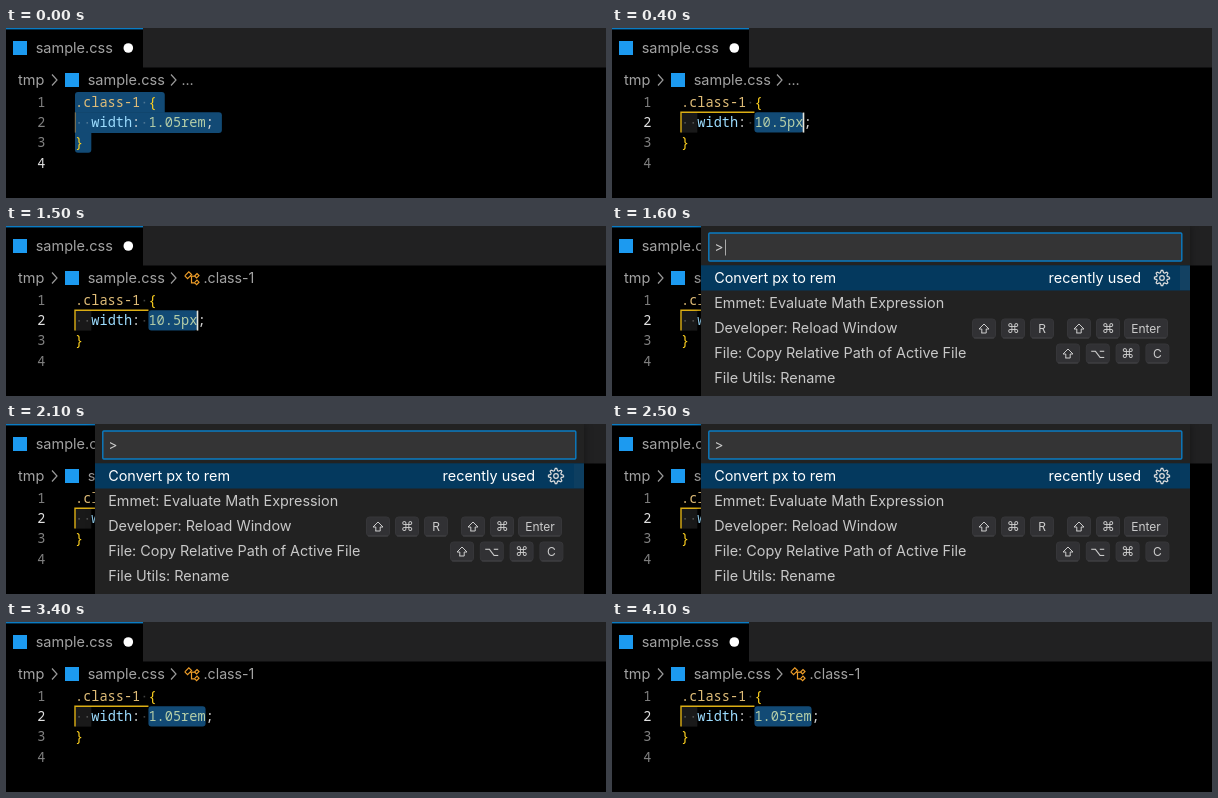
Write an HTML page with a canvas that moves like this. It is 600x170 px and loops after 4.2 s.

```html
<!DOCTYPE html>
<html lang="en">
<head>
<meta charset="utf-8">
<title>Convert px to rem</title>
<style>
  html, body { margin: 0; width: 100%; height: 100%; overflow: hidden; background: #000; }
  canvas { display: block; width: 600px; height: 170px; }
</style>
</head>
<body>
<canvas id="stage" width="600" height="170"></canvas>
<script>
const ctx = document.getElementById('stage').getContext('2d');
const LOOP = 4200, UNDO = 400, OUTLINE = 800, OPEN = 1600, CLOSE = 2600, BLINK = 500;
const UI = 'Inter, "Open Sans", sans-serif';
const MONO = '"Noto Sans Mono", "DejaVu Sans Mono", monospace';
const SYMBOLS = '"DejaVu Sans", sans-serif';
const CHAR = 8.16, LEFT = 69, TOP = 64.1, ROW = 20.25;
const SELECTION = '#124a75', BLUE = '#1c9af0', GOLD = '#ffd21f';

const col = n => LEFT + n * CHAR;
const lineTop = n => TOP + (n - 1) * ROW;
const blinkOn = age => Math.floor(age / BLINK) % 2 === 0;

function rect(x, y, w, h, fill) {
  ctx.fillStyle = fill;
  ctx.fillRect(x, y, w, h);
}

function box(x, y, w, h, radius, fill, stroke, width = 1) {
  ctx.beginPath();
  ctx.roundRect(x, y, w, h, radius);
  if (fill) { ctx.fillStyle = fill; ctx.fill(); }
  if (stroke) { ctx.strokeStyle = stroke; ctx.lineWidth = width; ctx.stroke(); }
}

function text(str, x, y, size, color, family = UI, align = 'left', weight = 400) {
  ctx.font = `${weight} ${size}px ${family}`;
  ctx.textAlign = align;
  ctx.fillStyle = color;
  ctx.fillText(str, x, y);
}

function line(points, color, width = 1.2) {
  ctx.beginPath();
  points.forEach(([x, y], i) => i ? ctx.lineTo(x, y) : ctx.moveTo(x, y));
  ctx.strokeStyle = color;
  ctx.lineWidth = width;
  ctx.stroke();
}

function code(row, start, str, color) {
  text(str, col(start), lineTop(row) + 14.8, 13.6, color, MONO, 'left', 500);
}

function dot(row, n) {
  rect(col(n) + 3.3, lineTop(row) + 9.7, 1.6, 1.6, 'rgba(227,228,226,.28)');
}

function caret(row, n) {
  rect(col(n) - 0.7, lineTop(row) + 0.2, 1.6, 20, '#e4e4dc');
}

function chevron(x) {
  line([[x - 2.5, 46.5], [x + 2.5, 52], [x - 2.5, 57.5]], '#999');
}

function classIcon(x, y) {
  const color = '#ee9d28';
  ctx.save();
  ctx.translate(x, y);
  line([[0.8, 4.8], [4.8, 0.8], [7.6, 3.6], [3.6, 7.6], [0.8, 4.8]], color);
  line([[6, 5.2], [11, 5.2]], color);
  line([[7.5, 5.2], [7.5, 11.8], [11, 11.8]], color);
  for (const dy of [5, 11.6])
    line([[10.6, dy], [13, dy - 2.4], [15, dy - 0.4], [12.6, dy + 2], [10.6, dy]], color);
  ctx.restore();
}

function header(outlined) {
  rect(137, 0, 463, 39.5, '#212122');
  rect(0, 0, 137, 1.4, '#0a7cc4');
  rect(7, 13, 14, 14, BLUE);
  text('sample.css', 29.7, 25, 14.5, '#a2a2a2');
  ctx.beginPath();
  ctx.arc(122.3, 20, 4.8, 0, 7);
  ctx.fillStyle = '#fff';
  ctx.fill();

  text('tmp', 12, 57, 14.5, '#a2a2a2');
  chevron(48.5);
  rect(59, 45, 14, 14, BLUE);
  text('sample.css', 81.7, 57, 14.5, '#a2a2a2');
  chevron(167.5);
  if (outlined) {
    classIcon(178, 45);
    text('.class-1', 197.5, 57, 14.2, '#a2a2a2');
  } else {
    text('…', 175.5, 57, 14, '#a2a2a2');
  }
}

function editor(value, undone) {
  const activeRow = undone ? 2 : 4;
  const valueEnd = 9 + value.length;
  const top = lineTop(2);

  rect(LEFT, top, 2 * CHAR, ROW, '#191919');
  if (undone) {
    box(col(9), top, value.length * CHAR, ROW, 3, SELECTION);
    line([[col(9), top - 0.1], [LEFT, top - 0.1], [LEFT, top + ROW]], '#dcae14', 1.4);
  } else {
    box(LEFT, lineTop(1), 11 * CHAR, ROW + 0.3, [3, 3, 0, 0], SELECTION);
    box(LEFT, top, (valueEnd + 2) * CHAR, ROW + 0.3, [0, 3, 3, 0], SELECTION);
    box(LEFT, lineTop(3), 2 * CHAR, ROW, [0, 0, 3, 3], SELECTION);
    line([[LEFT + 0.3, top], [LEFT + 0.3, top + ROW]], '#8b7950', 1);
  }

  for (let row = 1; row <= 4; row++)
    text(row, 39.5, lineTop(row) + 14.8, 13.6, row === activeRow ? '#e0e0e0' : '#808080', MONO, 'right');

  code(1, 0, '.class-1', '#e0bd78');
  code(1, 9, '{', GOLD);
  code(2, 2, 'width', '#9cdcfe');
  code(2, 7, ':', '#d4d4d4');
  code(2, 9, value, '#b5cea8');
  code(2, valueEnd, ';', '#d4d4d4');
  code(3, 0, '}', GOLD);
  dot(1, 8);
  [0, 1, 8].forEach(n => dot(2, n));
}

function shiftArrow(x, y) {
  line([[x - 2.2, y + 4.5], [x - 2.2, y + 0.5], [x - 5, y + 0.5], [x, y - 4.5],
    [x + 5, y + 0.5], [x + 2.2, y + 0.5], [x + 2.2, y + 4.5], [x - 2.7, y + 4.5]], '#ccc', 1);
}

function keycap(label, x, y, w = 24) {
  box(x + 0.5, y + 0.5, w - 1, 19, 3, '#313134', '#363639');
  rect(x + 2, y + 19, w - 4, 1, '#434346');
  const symbol = label.charCodeAt(0) > 255;
  if (label === '⇧') shiftArrow(x + w / 2, y + 10);
  else text(label, x + w / 2, y + 14.3, symbol ? 13 : 12, '#ccc', symbol ? SYMBOLS : UI, 'center');
}

function gear(x, y) {
  const points = [];
  for (let i = 0; i <= 32; i++) {
    const angle = (i - 0.5) * Math.PI / 16;
    const r = i % 4 < 2 ? 7.6 : 5.5;
    points.push([x + r * Math.cos(angle), y + r * Math.sin(angle)]);
  }
  line(points, '#ddd', 1.2);
  ctx.beginPath();
  ctx.arc(x, y, 2.3, 0, 7);
  ctx.stroke();
}

function palette(t) {
  ctx.save();
  ctx.shadowColor = 'rgba(0,0,0,.4)';
  ctx.shadowBlur = 8;
  rect(89, 0, 489, 170, '#222222');
  ctx.restore();

  box(96.8, 7, 473, 28, 1, '#343435', '#0a7cc4', 1.4);
  text('>', 102.5, 26, 13.5, '#ccc');
  if (blinkOn(t - OPEN)) rect(113, 13.5, 1, 16, '#aaa');

  rect(89, 39.3, 489, 25.2, '#04395e');
  const scrollAlpha = 0.12 * Math.min(1, Math.max(0, (CLOSE - t) / 800));
  rect(568, 40, 10, 24, `rgba(121,121,121,${scrollAlpha})`);

  const commands = ['Convert px to rem', 'Emmet: Evaluate Math Expression',
    'Developer: Reload Window', 'File: Copy Relative Path of Active File', 'File Utils: Rename'];
  commands.forEach((name, i) => text(name, 102.2, 57.3 + 25 * i, 14.4, i ? '#c8c8c8' : '#fff'));
  text('recently used', 529, 57.3, 14.4, '#fff', UI, 'right');
  gear(550, 52);

  [['⇧', 360], ['⌘', 389], ['R', 418], ['⇧', 455], ['⌘', 484]].forEach(([key, x]) => keycap(key, x, 92.5));
  keycap('Enter', 512, 92.5, 44);
  ['⇧', '⌥', '⌘', 'C'].forEach((key, i) => keycap(key, 444 + 29.8 * i, 117.5));
}

function draw(t) {
  const undone = t >= UNDO;
  const open = t >= OPEN && t < CLOSE;
  const value = undone && t < CLOSE ? '10.5px' : '1.05rem';

  rect(0, 0, 600, 170, '#000');
  header(t >= OUTLINE);
  editor(value, undone);
  if (open) palette(t);
  else if (!undone) { if (t >= 200) caret(4, 0); }
  else if (blinkOn(t - (t < OPEN ? UNDO : CLOSE))) caret(2, 9 + value.length);
}

const start = performance.now();
function tick() {
  draw((performance.now() - start) % LOOP);
  requestAnimationFrame(tick);
}
tick();
</script>
</body>
</html>
```
